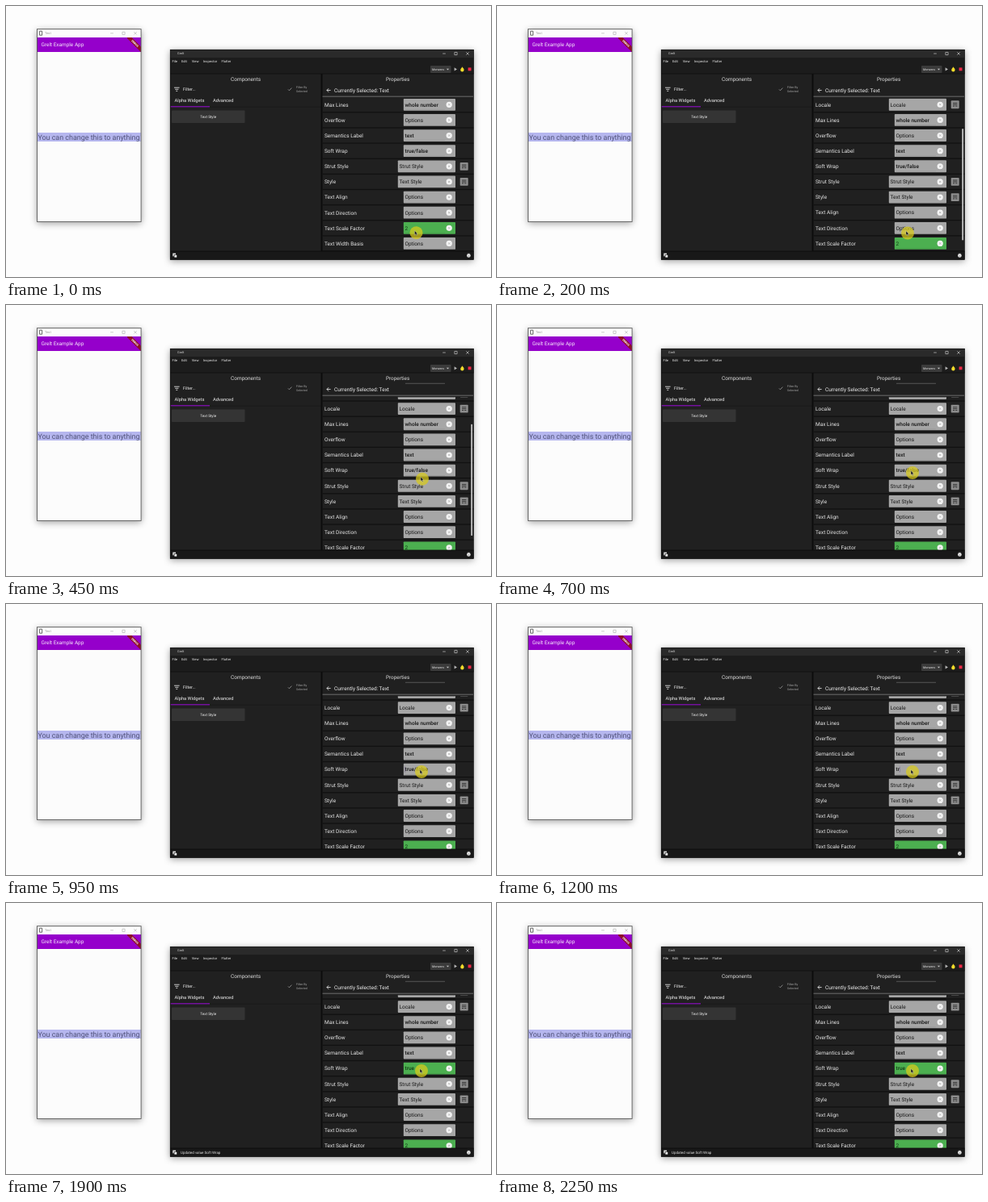
Recreate the animation shown at these times as an HTML page. Size 600 px wide and 336 px high, loop 2300 ms.

```html
<!DOCTYPE html>
<html lang="en">
<head>
<meta charset="utf-8">
<title>Widget property editor</title>
<style>
  html, body { margin: 0; width: 100%; height: 100%; overflow: hidden; background: #fdfdfd; }
  svg { display: block; width: 600px; height: 336px; }
  text { font-family: Roboto, "Liberation Sans", sans-serif; text-rendering: geometricPrecision; white-space: pre; }
  .shadow { filter: drop-shadow(0 2px 4px rgba(0, 0, 0, .38)); }
</style>
</head>
<body>
<svg id="stage" viewBox="0 0 600 336" xmlns="http://www.w3.org/2000/svg"></svg>
<script>
const LOOP = 2300, PITCH = 19.13, NOTCH = 6.36;
const GREY = '#a6a6a6', GREEN = '#4caf50', INK = '#161616';

const rect = (x, y, w, h, fill, more = '') =>
  `<rect x="${x}" y="${y}" width="${w}" height="${h}" fill="${fill}" ${more}/>`;
const text = (x, y, size, fill, str, more = '') =>
  `<text x="${x}" y="${y}" font-size="${size}" fill="${fill}" ${more}>${str}</text>`;
const line = (d, color, width = 0.8, more = '') =>
  `<path d="${d}" fill="none" stroke="${color}" stroke-width="${width}" ${more}/>`;
const dot = (x, y, r, fill, more = '') =>
  `<circle cx="${x}" cy="${y}" r="${r}" fill="${fill}" ${more}/>`;
const MID = 'text-anchor="middle"';

// minimise, maximise and close buttons
const controls = (xs, y, color, w) =>
  line(`M${xs[0] - 1.8} ${y}h3.6M${xs[1] - 1.6} ${y - 1.6}h3.2v3.2h-3.2z` +
       `M${xs[2] - 1.7} ${y - 1.7}l3.4 3.4m0 -3.4l-3.4 3.4`, color, w);

function appWindow() {
  return `<g class="shadow">${rect(38.3, 28.5, 129, 239, '#fcfcfc')}</g>` +
    rect(38.5, 39, 128.5, 18, '#9500cb') +
    line('M41.6 31.2h3v5h-3z', '#444', 0.8) +
    text(48, 35.4, 4, '#999', 'Test') +
    controls([131, 145.5, 160], 33.8, '#999', 0.5) +
    text(43.5, 50.3, 6.45, '#f6e9fb', 'Grelt Example App') +
    `<g clip-path="url(#corner)"><g transform="translate(159.6 46.4) rotate(45)">` +
    rect(-15, -2.4, 30, 4.8, '#8f1028') +
    text(0, 1.2, 3.3, '#fff', 'DEBUG', MID + ' font-weight="800"') + '</g></g>' +
    rect(38.8, 157, 128, 11, '#b5b6ee') +
    text(39.4, 165.7, 8.93, '#50527a', 'You can change this to anything') +
    rect(38.5, 28.7, 128.6, 238.7, 'none', 'stroke="#555" stroke-width=".9"');
}

function toolFrame() {
  const menu = [[205.5, 'File'], [217, 'Edit'], [229.7, 'View'], [244, 'Inspector'], [266.5, 'Flutter']];
  return `<g class="shadow">${rect(203, 54, 375.5, 260.5, '#202020')}</g>` +
    rect(203, 54, 375.5, 10, '#2a2a2a') +
    rect(203, 64, 375.5, 20, '#1c1c1c') +
    text(212, 60.4, 3.9, '#d0d0d0', 'Grelt') +
    controls([542, 556.5, 571], 59, '#ddd', 0.6) +
    menu.map(([x, s]) => text(x, 70.4, 4.1, '#ececec', s)).join('') +
    rect(525, 74, 25.5, 9, '#3b3b3b', 'rx=".8"') +
    text(527, 79.9, 3.7, '#e4e4e4', 'Morwens') +
    `<path d="M545 77.8h3l-1.5 1.7z" fill="#ccc"/><path d="M554.6 76.2l3.4 2.2l-3.4 2.2z" fill="#b5b5b5"/>` +
    `<path d="M564.3 75.2c.5 1.5 2.5 2 2.3 4a2.2 2.2 0 0 1 -4.4 0c0-1.6 1.6-2.1 2.1-4z" fill="#f3dc2b"/>` +
    rect(571.6, 76.4, 3.9, 3.9, '#ef2846') +
    rect(203, 83.6, 375.5, 0.9, '#111') +
    // left pane
    text(296.6, 92.5, 6.5, '#dcdcdc', 'Components', MID) +
    line('M208 101.2h6.6M209.2 103.3h4.2M210.4 105.4h1.8', '#e0e0e0', 0.9) +
    text(219, 105, 5.3, '#f0f0f0', 'Filter...') +
    line('M349 103.4l1.4 1.4l3 -3.2', '#b0b0b0', 0.7) +
    text(359, 102.3, 3.7, '#a5a5a5', 'Filter By') +
    text(359, 106.6, 3.6, '#a5a5a5', 'Selected') +
    text(208.5, 119.2, 5.75, '#efefef', 'Alpha Widgets') +
    text(256, 119.2, 5.78, '#efefef', 'Advanced') +
    rect(203, 124.8, 187, 0.7, '#161616') +
    rect(203.5, 124.2, 48.5, 1.2, '#8a10bd') +
    rect(205, 129.6, 90.5, 15.4, '#343434', 'rx=".8"') +
    text(250.2, 138.9, 4.6, '#f2f2f2', 'Text Style', MID) +
    // right pane header
    rect(389.6, 84, 1.9, 220, '#0c0c0c') +
    text(484.6, 92.5, 6.4, '#dcdcdc', 'Properties', MID) +
    line('M401.6 104.5h-4.6m2.2 -2.3l-2.3 2.3l2.3 2.3', '#eee', 0.8) +
    text(406, 106.9, 6.5, '#efefef', 'Currently Selected: Text') +
    `<rect id="edge" x="494" y="96.8" width="49" height=".9" fill="#5a5a5a"/>` +
    rect(391.5, 111.7, 187, 0.9, '#757575');
}

function statusBar() {
  return rect(203, 304, 375.5, 10.5, '#181818') +
    rect(203, 303.6, 375.5, 0.8, '#0b0b0b') +
    rect(206.3, 306.6, 3.7, 3.7, '#eee') + rect(208, 308.3, 3.7, 3.7, '#eee', 'stroke="#181818" stroke-width=".7"') +
    dot(572.4, 309.4, 2.3, '#f0f0f0') + line('M571 306l2.8 0M571.4 309h2M571.4 310.4h2', '#555', 0.4) +
    `<g id="notice">${text(216, 310.9, 4.5, '#e6e6e6', 'Updated value Soft Wrap')}</g>`;
}

// label, value, has an extra button
const ROWS = [
  ['Text Span', 'Text Span', 1], ['Locale', 'Locale', 1], ['Max Lines', 'whole number'], ['Overflow', 'Options'],
  ['Semantics Label', 'text'], ['Soft Wrap', 'true/false'], ['Strut Style', 'Strut Style', 1],
  ['Style', 'Text Style', 1], ['Text Align', 'Options'], ['Text Direction', 'Options'],
  ['Text Scale Factor', '2'], ['Text Width Basis', 'Options']
];

function row([label, value, wide], i) {
  const y = 122.3 + (i - 2) * PITCH, x = wide ? 484.8 : 491.8;
  const soft = label === 'Soft Wrap', typed = /^[a-z2]/.test(value);
  return rect(391.5, y + 8.9, 187, 1.3, '#111') +
    text(394, y + 2.3, 6.5, '#e6e6e6', label) +
    rect(x, y - 7.4, 556 - x, 14.8, value === '2' ? GREEN : GREY, `rx=".9" ${soft ? 'id="box"' : ''}`) +
    (typed ? rect(494, y + 5.9, 49, 0.5, '#000', 'opacity=".13"') : '') +
    text(x + 1.7, y + 2.3, 6.5, value === '2' ? '#123c16' : INK, value,
      (typed && value !== '2' ? 'font-weight="500" ' : '') + (soft ? 'id="value"' : '')) +
    (soft ? `<rect id="caret" y="${y - 3.6}" width=".7" height="7.2" fill="#6c5a86"/>` : '') +
    dot(548.2, y, 3.6, '#f5f5f5') +
    line(`M547.1 ${y - 1.1}l2.2 2.2m0 -2.2l-2.2 2.2`, '#999', 0.6) +
    (wide ? rect(561.7, y - 4.9, 10, 9.8, '#8d8d8d', 'rx=".8"') +
      line(`M564 ${y - 1.9}h5.4M564 ${y}h5.4M564 ${y + 1.9}h2.2m1 0h2.2`, '#222', 0.8) : '');
}

document.getElementById('stage').innerHTML =
  `<defs><clipPath id="corner">${rect(150, 39, 17, 18, '#000')}</clipPath>` +
  `<clipPath id="view">${rect(391.5, 114.3, 187, 189.7, '#000')}</clipPath></defs>` +
  rect(0, 0, 600, 336, '#fdfdfd') + appWindow() + toolFrame() +
  `<g clip-path="url(#view)"><g id="list">${ROWS.map(row).join('')}</g></g>` +
  rect(575.3, 0, 1.7, 138, '#c9c9c9', 'id="thumb"') + statusBar() +
  rect(203.2, 54.2, 375.1, 260.1, 'none', 'stroke="#111" stroke-width=".6"') +
  `<g id="pointer">${dot(0, 0, 8, '#d9cc1c', 'opacity=".72"')}` +
  `<path d="M-2 -2.6v5.2l1.2 -1.1l.9 2l.9 -.4l-.9 -1.9h1.6z" fill="#111" stroke="#eee" stroke-width=".35"/></g>`;

const el = Object.fromEntries(['edge', 'list', 'thumb', 'notice', 'box', 'value', 'caret', 'pointer']
  .map(id => [id, document.getElementById(id)]));

const WHEEL = [50, 100, 150, 250];
const TYPING = [[0, 'true/false'], [1150, 't'], [1200, 'tr'], [1300, 'tru'], [1350, 'true']];
const PATH = [[0, 507.5, 281.2], [200, 508, 281.5], [300, 509.5, 265], [400, 513.6, 229], [450, 515, 215.7], [550, 514, 208]];

const clamp = v => Math.min(1, Math.max(0, v));
function pointAt(t) {
  const k = PATH.findIndex(p => p[0] > t);
  if (k < 0) return PATH[PATH.length - 1].slice(1);
  const a = PATH[k - 1], b = PATH[k], u = (t - a[0]) / (b[0] - a[0]);
  return [a[1] + (b[1] - a[1]) * u, a[2] + (b[2] - a[2]) * u];
}
const show = (node, v) => node.setAttribute('opacity', v);

function draw(t) {
  const turns = WHEEL.filter(w => t >= w).length, done = t >= 1500;
  el.list.setAttribute('transform', `translate(0 ${turns * NOTCH})`);
  show(el.edge, turns === 4 ? 1 : 0);
  el.thumb.setAttribute('y', 165.5 - turns * 4.4);
  show(el.thumb, turns ? 1 - clamp((t - 550) / 150) : 0);

  const value = TYPING.filter(s => t >= s[0]).pop()[1];
  if (el.value.textContent !== value) el.value.textContent = value;
  el.value.setAttribute('fill', done ? '#123c16' : INK);
  el.box.setAttribute('fill', done ? GREEN : GREY);
  const end = t < 1150 ? 0 : el.value.getComputedTextLength();
  el.caret.setAttribute('x', 493.4 + end);
  show(el.caret, t >= 800 && !done ? 0.7 : 0);
  show(el.notice, done ? 1 : 0);
  el.pointer.setAttribute('transform', `translate(${pointAt(t).join(' ')})`);
}

const start = performance.now();
function tick() {
  draw(Math.floor(((performance.now() - start) % LOOP) / 50) * 50);
  requestAnimationFrame(tick);
}
tick();
</script>
</body>
</html>
```
